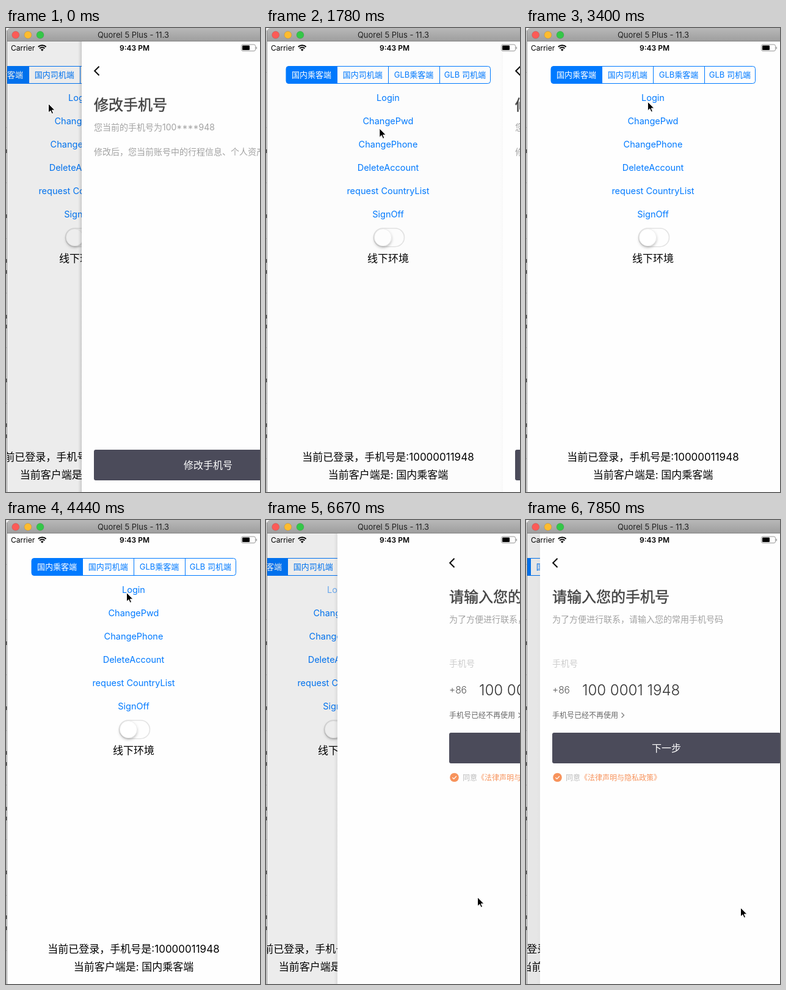
An HTML page that plays this animation: 416x757 px, repeating every 8 s.

```html
<!DOCTYPE html>
<html lang="zh-CN">
<head>
<meta charset="utf-8">
<title>Simulator</title>
<style>
  html, body { margin: 0; width: 100%; height: 100%; overflow: hidden; background: #fefefe; }
  svg { display: block; width: 416px; height: 757px; }
  text { font-family: Inter, "Noto Sans CJK SC", "Noto Sans CJK", sans-serif; white-space: pre; }
  .mid { text-anchor: middle; }
  .light { font-weight: 300; }
  .head { stroke: #444; stroke-width: .5px; }
  .bold { font-weight: 600; }
</style>
</head>
<body>
<svg viewBox="0 0 416 757">
  <defs>
    <linearGradient id="bar" x2="0" y2="1">
      <stop stop-color="#b8b8b8"/><stop offset="1" stop-color="#9d9d9d"/>
    </linearGradient>
    <linearGradient id="edge">
      <stop stop-color="#000" stop-opacity="0"/><stop offset="1" stop-color="#000" stop-opacity=".5"/>
    </linearGradient>
    <linearGradient id="haze">
      <stop stop-color="#f8f8f8"/><stop offset="1" stop-color="#fefefe"/>
    </linearGradient>
    <filter id="soft" x="-50%" y="-50%" width="200%" height="200%">
      <feDropShadow dx="0" dy="2.5" stdDeviation="2" flood-opacity=".25"/>
    </filter>
    <clipPath id="screen"><path d="M2 22H416V757H2z"/></clipPath>
  </defs>
  <g id="desktop"></g>
  <g clip-path="url(#screen)">
    <path d="M2 22H416V757H2z" fill="#fefefe"/>
    <g id="menu"></g>
    <path id="dim" d="M2 22H416V757H2z"/>
    <g id="page">
      <path id="shadow" d="M-6 22H0V757H-6z" fill="url(#edge)"/>
      <path d="M0 22H414V757H0z" fill="#fefefe"/>
      <path id="strip" d="M0 22H97V757H0z" fill="url(#haze)"/>
      <g id="change"></g>
      <g id="login"></g>
    </g>
  </g>
  <g id="chrome"></g>
  <path id="cursor" d="M0 0V14.6L3.4 11.4 5.7 16.6 8 15.6 5.8 10.6H10.4z" fill="#000" stroke="#fff" stroke-width="1"/>
</svg>
<script>
const $ = id => document.getElementById(id);
const BLUE = '#007aff', DARK = '#4b4b5a', ORANGE = '#f7935c';

const text = (x, y, size, fill, str, cls = '') =>
  `<text x="${x}" y="${y}" font-size="${size}" fill="${fill}" class="${cls}">${str}</text>`;
const rect = (x, y, w, h, r, attrs) =>
  `<rect x="${x}" y="${y}" width="${w}" height="${h}" rx="${r}" ${attrs}/>`;
const circle = (x, y, r, attrs) => `<circle cx="${x}" cy="${y}" r="${r}" ${attrs}/>`;
const line = (d, color, width) =>
  `<path d="${d}" fill="none" stroke="${color}" stroke-width="${width}"/>`;

const backArrow = line('M28.5 62.7L21.2 70 28.5 77.3', '#111', 2.1);
const button = (y, label) => rect(20, y, 374, 50, 3, `fill="${DARK}"`) +
  text(207, y + 31, 16, '#fff', label, 'mid light');

// Sliver of the window behind the simulator
$('desktop').innerHTML =
  rect(0, 0, 2, 757, 0, 'fill="#e6e6e6"') +
  [72, 162, 252, 343, 432, 521, 612, 702].map(y => rect(0, y, 2, 1, 0, 'fill="#bbb"')).join('') +
  rect(1, 4, 1, 753, 0, 'fill="#8c8c8c"') +
  [198, 304, 377, 395, 468, 484, 572, 645, 663].map(y => rect(0, y, 1.6, 6, 0, 'fill="#555"')).join('');

const segments = ['国内乘客端', '国内司机端', 'GLB乘客端', 'GLB 司机端'];
const links = ['Login', 'ChangePwd', 'ChangePhone', 'DeleteAccount', 'request CountryList', 'SignOff'];
$('menu').innerHTML =
  rect(42, 62.5, 334.5, 28, 4, `fill="#fefefe" stroke="${BLUE}"`) +
  `<path d="M126 62.5H46a4 4 0 0 0-4 4V86.5a4 4 0 0 0 4 4H126z" fill="${BLUE}"/>` +
  line('M209.5 62.5V90.5M293.5 62.5V90.5', BLUE, 1) +
  segments.map((s, i) => text(83.5 + 83.8 * i, 81.2, 13, i ? BLUE : '#fff', s, 'mid')).join('') +
  links.map((s, i) => text(209, 118.5 + 38 * i, 14.5, BLUE, s, 'mid link')).join('') +
  rect(185.5, 326.7, 50, 30, 15, 'fill="#fefefe" stroke="#e3e3e3" stroke-width="1.6"') +
  circle(200.5, 341.7, 14, 'fill="#fff" stroke="#ddd" stroke-width=".5" filter="url(#soft)"') +
  text(209, 382, 17, '#000', '线下环境', 'mid') +
  text(209, 706, 17, '#000', '当前已登录，手机号是:10000011948', 'mid') +
  text(209, 734.5, 17, '#000', '当前客户端是: 国内乘客端', 'mid');

$('change').innerHTML = backArrow +
  text(20, 134, 24, '#444', '修改手机号', 'head') +
  text(20, 167, 14, '#a2a2a2', '您当前的手机号为100****948') +
  text(20, 207, 14, '#a2a2a2', '修改后，您当前账号中的行程信息、个人资产') +
  button(688, '修改手机号');

$('login').innerHTML = backArrow +
  text(20, 134, 24, '#444', '请输入您的手机号', 'head') +
  text(20, 167, 14, '#a2a2a2', '为了方便进行联系，请输入您的常用手机号码') +
  text(20, 238.5, 14, '#ccc', '手机号') +
  text(20, 283, 15.5, '#555', '+86', 'light') +
  text(69, 285.7, 24, '#333', '100 0001 1948', 'light') +
  text(20, 322.8, 12, '#666', '手机号已经不再使用') +
  line('M133.5 314.5L137.5 318.5 133.5 322.5', '#777', 1.2) +
  button(347, '下一步') +
  circle(28.5, 420, 7.3, `fill="${ORANGE}"`) +
  line('M25.3 420.2L27.7 422.4 31.8 418', '#fff', 1.2) +
  text(42, 424.6, 12, '#bbb', '同意') +
  text(66, 424.6, 12, ORANGE, '《法律声明与隐私政策》');

$('chrome').innerHTML =
  '<path d="M2 22V5a5 5 0 0 1 5-5H416V22z" fill="url(#bar)"/>' +
  rect(2, 21, 414, 1, 0, 'fill="#858585"') +
  ['#fc5b57', '#fdbc30', '#34c748'].map((c, i) =>
    circle(15.8 + 20.1 * i, 11.3, 6, `fill="${c}" stroke="#0003" stroke-width=".6"`)).join('') +
  text(208.5, 16, 13, '#222', 'Quorel 5 Plus - 11.3', 'mid') +
  text(8, 36.6, 12, '#000', 'Carrier') +
  text(210.5, 36.7, 12, '#000', '9:43 PM', 'mid bold') +
  line('M52.8 30.8a9 9 0 0 1 12.8 0M55.1 33.3a6 6 0 0 1 8.2 0', '#000', 2) +
  '<path d="M59.2 37.7L56.9 35.3a3.4 3.4 0 0 1 4.6 0z"/>' +
  rect(385.5, 27, 23, 10.5, 2.5, 'fill="none" stroke="#999"') +
  rect(387, 28.5, 12, 7.5, 1, 'fill="#000"') +
  rect(409.6, 30.4, 1.4, 4, 0.7, 'fill="#999"');

const LOOP = 8000, STEPS = 54, WIDTH = 414;
const POP_START = -589, PUSH_START = 5280, PRESS = 5190;
const loginLink = document.querySelector('.link');

// Share of the way still to go for a critically damped spring
const spring = ms => { const x = 1.84 * ms / 1000; return (1 + x) * Math.exp(-x); };
const clamp = x => Math.min(1, Math.max(0, x));
const smooth = x => { x = clamp(x); return x * x * (3 - 2 * x); };

const cursorPath = [
  [0, 69.5, 123.5], [1040, 167, 218.5], [2400, 200.5, 121.5], [2670, 200.5, 121.5],
  [4440, 197.5, 118.5], [5190, 202.5, 118], [5780, 202.5, 118],
  [6670, 346.5, 615.5], [7850, 351.5, 632.5]
];
function cursorAt(t) {
  const i = cursorPath.findIndex(p => p[0] > t);
  if (i < 0) return cursorPath[cursorPath.length - 1].slice(1);
  const [t0, x0, y0] = cursorPath[i - 1], [t1, x1, y1] = cursorPath[i];
  const k = smooth((t - t0) / (t1 - t0));
  return [x0 + (x1 - x0) * k, y0 + (y1 - y0) * k];
}

const move = (id, x, y = 0) => $(id).setAttribute('transform', `translate(${x} ${y})`);

function draw(t) {
  const pushing = t >= PUSH_START;
  const left = spring(t - (pushing ? PUSH_START : POP_START));
  const cover = pushing ? 1 - left : left;

  move('menu', Math.round(-0.3 * WIDTH * cover));
  move('page', Math.round(416 - WIDTH * cover));
  $('dim').setAttribute('opacity', 0.1 * cover);
  $('shadow').setAttribute('opacity', left * (pushing ? 0.5 : 0.4));
  $('strip').setAttribute('opacity', pushing ? clamp((6500 - t) / 600) : 0);
  $('change').setAttribute('visibility', pushing ? 'hidden' : 'visible');
  $('login').setAttribute('visibility', pushing ? 'visible' : 'hidden');
  move('login', Math.round(WIDTH * (1 - smooth((t - 5239) / 2500))));
  loginLink.setAttribute('opacity', t < PRESS ? 1 : 0.2 + 0.8 * smooth((t - PUSH_START) / 3000));
  move('cursor', ...cursorAt(t));
}

function tick() {
  const step = LOOP / STEPS;
  const n = Math.min(STEPS - 1, Math.floor((performance.now() % LOOP + 15) / step));
  draw(n * step);
  requestAnimationFrame(tick);
}
tick();
</script>
</body>
</html>
```
